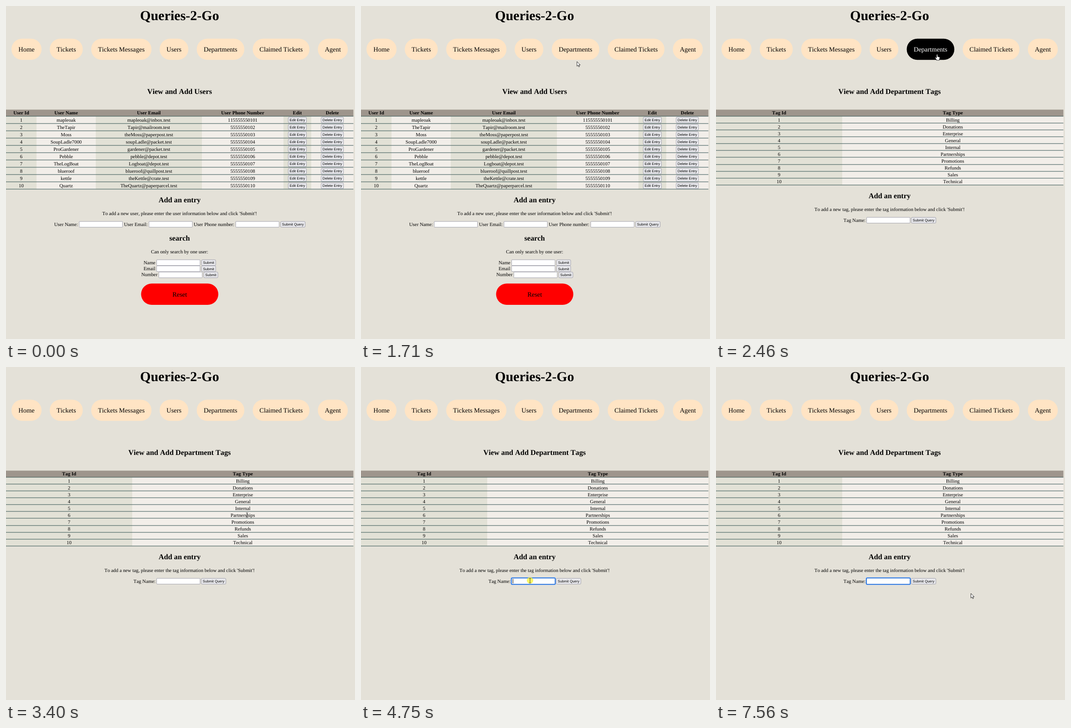
These frames come from a looping animation (766x731 px, 8 s). An HTML page:

```html
<!DOCTYPE html>
<html lang="en">
<head>
<meta charset="utf-8">
<title>Queries-2-Go</title>
<style>
  html, body { margin: 0; width: 100%; height: 100%; overflow: hidden; background: #e4e1d8; }
  svg { display: block; width: 100%; height: 100%; }
  text {
    font: 10.84px "Liberation Serif", "Times New Roman", serif;
    font-kerning: none;
    text-rendering: geometricPrecision;
  }
  .mid { text-anchor: middle; }
  .bold { font-weight: bold; }
  .title { font-size: 30px; font-weight: bold; }
  .heading { font-size: 16.26px; font-weight: bold; }
  .nav { font-size: 14.45px; }
  .label { font: 7.8px "Liberation Sans", Arial, sans-serif; }
  .button { fill: #e9e9ed; stroke: #8f8f9d; stroke-width: .8; }
  .input { fill: #fff; stroke: #8f8f9d; stroke-width: .8; }
  .rule { stroke: #2f4f4f; stroke-width: 1.2; }
  .active rect { fill: #000; }
  .active text { fill: #fff; }
  .hot { stroke: #50505c; }
  .pointer { fill: #fff; stroke: #000; stroke-width: .8; stroke-linejoin: round; }
</style>
</head>
<body>
<svg viewBox="0 0 766 731">
  <g id="shell"></g>
  <g id="users"></g>
  <g id="tags"></g>
  <g id="focus">
    <rect x="329.3" y="462.3" width="97.8" height="15.6" rx="2.5" fill="none" stroke="#a9c8f3" stroke-width="1.6"/>
    <rect x="330.2" y="463.2" width="96" height="13.8" rx="1.5" fill="#fff" stroke="#0a60d8" stroke-width="1.6"/>
  </g>
  <rect id="caret" x="333" y="465" width="1" height="10"/>
  <g id="cursor">
    <circle id="press" cy="-.5" r="7" fill="#f8f23c" opacity=".8"/>
    <path id="arrow" class="pointer" d="M0 0V10.2L2.4 8 4 11.6 5.7 10.9 4.1 7.4H7.2Z"/>
    <path id="hand" class="pointer" d="M-1.2 1Q0 -.8 1.2 1V5L5 6Q6 6.3 6 7.5L5 11.5V13H-1.6V11.5L-4.2 8Q-4.4 6.2 -2.8 6.7L-1.2 8.2Z"/>
    <path id="beam" d="M-2.2 -5H-.6L0 -4.5.6 -5H2.2M0 -4.5V4.5M-2.2 5H-.6L0 4.5.6 5H2.2" fill="none" stroke="#333" stroke-width=".9"/>
  </g>
</svg>
<script>
const $ = id => document.getElementById(id);
const CENTER = 381, TABLE_WIDTH = 762.5, LOOP = 8000;

const text = (x, y, s, cls = '') => `<text x="${x}" y="${y}" class="${cls}">${s}</text>`;
const mid = (x, y, s, cls = '') => text(x, y, s, 'mid ' + cls);
const box = (x, y, w, h, attrs) => `<rect x="${x}" y="${y}" width="${w}" height="${h}" ${attrs}/>`;
const pill = (x, y, w, h, fill, s) =>
  box(x, y, w, h, `rx="${h / 2}" fill="${fill}"`) + mid(x + w / 2, y + 28.6, s, 'nav');
const button = (x, y, w, s) =>
  box(x, y, w, 12.6, 'rx="2" class="button"') + mid(x + w / 2, y + 9.1, s, 'label');
const input = (x, y, attrs = '') => box(x, y, 95.2, 12.6, `rx="1" class="input" ${attrs}`);

// edges: column boundaries; cell(value, centre, baseline) draws one entry
function table(edges, heads, rows, pitch, cell) {
  const top = 242, bottom = top + pitch * rows.length;
  const centre = i => (edges[i] + edges[i + 1]) / 2;
  const rule = i => `<path class="rule" d="M0 ${Math.round(top + pitch * i)}H${TABLE_WIDTH}"/>`;
  return heads.map((_, i) =>
      box(edges[i], top, edges[i + 1] - edges[i], bottom - top, `fill="${i % 2 ? '#f2eee9' : '#e2e1d6'}"`)).join('') +
    box(0, 227.5, TABLE_WIDTH, 14.5, 'fill="#9e958c"') +
    heads.map((s, i) => mid(centre(i), 238, s, 'bold')).join('') +
    rows.map((row, r) => row.map((s, i) => cell(s, centre(i), top + pitch * r + 11.5)).join('')).join('') +
    [rule(0), ...rows.map((_, r) => rule(r + 1))].join('');
}

const navItems = [
  ['Home', 12, 66], ['Tickets', 96, 72.5], ['Tickets Messages', 187, 132.3], ['Users', 337.2, 63],
  ['Departments', 418.6, 104.5], ['Claimed Tickets', 541.5, 124.6], ['Agent', 684.5, 65.7]
];
$('shell').innerHTML = mid(CENTER, 31, 'Queries-2-Go', 'title') +
  navItems.map(([s, x, w]) => `<g id="${s.replace(' ', '')}">${pill(x, 71.8, w, 46.4, '#ffe4c4', s)}</g>`).join('');

const people = [
  ['mapleoak', 'mapleoak@inbox.test', '115555550101'],
  ['TheTapir', 'Tapir@mailroom.test', '5555550102'],
  ['Moss', 'theMoss@paperpost.test', '5555550103'],
  ['SoupLadle7000', 'soupLadle@packet.test', '5555550104'],
  ['ProGardener', 'gardener@packet.test', '5555550105'],
  ['Pebble', 'pebble@depot.test', '5555550106'],
  ['TheLogBoat', 'Logboat@depot.test', '5555550107'],
  ['blueroof', 'blueroof@quillpost.test', '5555550108'],
  ['kettle', 'theKettle@crate.test', '5555550109'],
  ['Quartz', 'TheQuartz@paperparcel.test', '5555550110']
].map((p, i) => [i + 1, ...p, 'Edit Entry', 'Delete Entry']);

const textCell = (s, x, y) => mid(x, y, s);
const userCell = (s, x, y) => {
  const w = { 'Edit Entry': 40, 'Delete Entry': 49 }[s];
  return w ? button(x - w / 2, y - 9.5, w, s) : textCell(s, x, y);
};
const searchRow = (s, x, y, shift) =>
  text(x, y + 9.4, s) + input(330.7 + shift, y) + button(429.2 + shift, y, 31, 'Submit');

$('users').innerHTML = mid(CENTER, 193.3, 'View and Add Users', 'heading') +
  table([0, 67, 197, 430, 609, 670, TABLE_WIDTH],
    ['User Id', 'User Name', 'User Email', 'User Phone Number', 'Edit', 'Delete'], people, 16.04, userCell) +
  mid(CENTER, 431, 'Add an entry', 'heading') +
  mid(CENTER, 459, "To add a new user, please enter the user information below and click 'Submit'!") +
  text(105.8, 482.5, 'User Name:') + input(160.7, 473) +
  text(259, 482.5, 'User Email:') + input(313.8, 473) +
  text(412, 482.5, 'User Phone number:') + input(504.2, 473) +
  button(602.6, 473, 54, 'Submit Query') +
  mid(CENTER, 515, 'search', 'heading') +
  mid(CENTER, 542.5, 'Can only search by one user:') +
  searchRow('Name', 302, 557.1, 0) + searchRow('Email', 302, 570.4, 0) + searchRow('Number', 297, 584, 4.8) +
  pill(296.5, 609.2, 169.5, 46.8, '#f00', 'Reset');

const tagNames = ['Billing', 'Donations', 'Enterprise', 'General', 'Internal',
  'Partnerships', 'Promotions', 'Refunds', 'Sales', 'Technical'];

$('tags').innerHTML = mid(CENTER, 193.3, 'View and Add Department Tags', 'heading') +
  table([0, 277, TABLE_WIDTH], ['Tag Id', 'Tag Type'], tagNames.map((s, i) => [i + 1, s]), 15.08, textCell) +
  mid(CENTER, 422, 'Add an entry', 'heading') +
  mid(CENTER, 450, "To add a new tag, please enter the tag information below and click 'Submit'!") +
  text(279.8, 473.6, 'Tag Name:') + input(330.7, 464, 'id="tagInput"') +
  button(428.6, 464, 54, 'Submit Query');

// [start ms, x, y, pointer shape]; each pose holds until the next
const poses = [
  [0, 0, 0, ''],
  [130, 703, 618, 'arrow'], [200, 660, 480, 'arrow'], [260, 612, 310, 'arrow'], [330, 589, 237, 'arrow'],
  [660, 583, 226, 'arrow'], [720, 562, 193, 'arrow'], [790, 544, 166, 'arrow'], [850, 537, 155, 'arrow'],
  [1050, 520, 144, 'arrow'], [1120, 488, 127, 'arrow'], [1190, 474.5, 121, 'arrow'],
  [1390, 474, 121, 'arrow'], [1710, 474, 122, 'arrow'],
  [2040, 475, 120, 'arrow'], [2130, 480, 113, 'hand'], [2200, 484, 108, 'hand'], [2260, 485, 106, 'hand'],
  [2330, 484.5, 105.7, 'arrow'], [2460, 485.3, 106, 'hand'],
  [2530, 497, 160, 'arrow'], [2660, 517, 285, 'arrow'], [2740, 526, 333, 'arrow'], [2990, 526, 332.5, 'arrow'],
  [3400, 529, 325, 'beam'], [3470, 526, 307, 'beam'], [3540, 490, 345, 'arrow'], [3600, 440, 402, 'arrow'],
  [3670, 396, 447, 'beam'], [3810, 375, 466, 'beam'], [3880, 371, 469, 'beam'],
  [4960, 390, 475, 'beam'], [5030, 440, 493, 'arrow'], [5100, 505, 503, 'arrow'],
  [5160, 542, 502, 'arrow'], [5230, 556, 499, 'arrow'], [5290, 559.5, 497, 'arrow']
];
const show = (id, on) => { $(id).style.display = on ? '' : 'none'; };
const within = (t, from, to) => t >= from && t < to;

function draw(now) {
  const t = now % LOOP;
  const [, x, y, shape] = poses.findLast(p => p[0] <= t);
  $('cursor').setAttribute('transform', `translate(${x} ${y})`);
  for (const id of ['arrow', 'hand', 'beam']) show(id, id === shape);
  show('press', within(t, 4750, 4890));
  $('Departments').classList.toggle('active', within(t, 2130, 2530));
  show('users', t < 2460);
  show('tags', t >= 2460);
  $('tagInput').classList.toggle('hot', within(t, 3810, 4750));
  show('focus', t >= 4750);
  show('caret', within(t, 4750, 5290) || within(t, 5830, 6430) || within(t, 6960, 7560));
}

const start = performance.now();
function tick() {
  draw(performance.now() - start);
  requestAnimationFrame(tick);
}
tick();
</script>
</body>
</html>
```
